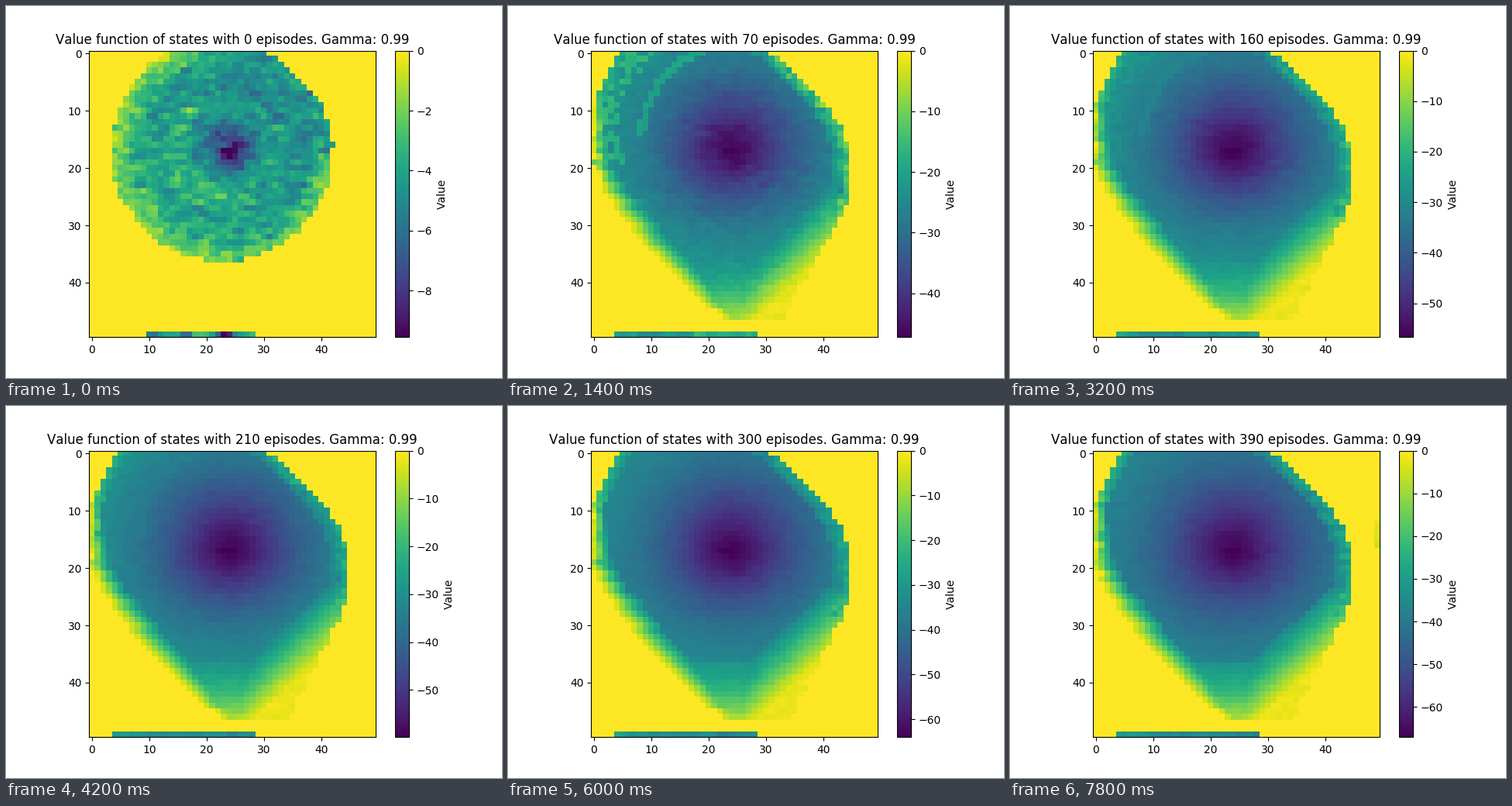
Write a matplotlib script that moves like this. It is 640 px wide and 480 px high and loops after 8 s.

```python
import numpy as np
import matplotlib.pyplot as plt
from matplotlib.animation import FuncAnimation

plt.rcParams["text.kerning_factor"] = 6

N = 50
FRAMES = 40
STEP_MS = 200
EPISODES_PER_FRAME = 10
ROW, COL = np.mgrid[0:N, 0:N].astype(float)
DX, DY = COL - 24, ROW - 17
DISC_RADIUS = 19


def grain(seed):
    """Cell noise, slightly stretched along the rows."""
    n = np.random.default_rng(seed).normal(size=(N, N))
    return (n + np.roll(n, 1, axis=1)) / 1.41


STEADY = grain(4)
DASHES = np.random.default_rng(11).random((N, N))
JITTER = np.random.default_rng(2).uniform(-.4, .4, (N, 1))


def lowest(episodes):
    return -(9.55 + 11.8 * np.log(1 + episodes / 3))


def growth(episodes):
    """0 for the first disc, 1 once the full region has been visited."""
    return min(1, np.sqrt(episodes / 30))


def bounds(episodes):
    """First and one-past-last visited column of every row."""
    r = ROW[:, :1]
    late = np.clip((episodes - 30) / 60, 0, 1)
    below = np.clip(r - 19, 0, None)
    left = (5 * np.clip(1 - r / 10, 0, None) ** 1.2
            + .418 * below + .016 * below ** 2)
    right = np.where(r < 20, 45.3 - .035 * (20 - r) ** 2,
                     45 - (.72 - .22 * late) * np.clip(r - 26, 0, None))
    right = np.minimum(right, 44 + late)

    dy = (r - 17.3) * np.where(r < 17, .94, 1)
    half = np.sqrt(np.clip(DISC_RADIUS ** 2 - dy ** 2, 0, None)) + JITTER
    inside = r < 37
    disc_left = np.where(inside, 23 - half, 24)
    disc_right = np.where(inside, np.minimum(23.3 + half, right), 24)

    g = growth(episodes)
    return (np.round(disc_left + (left - disc_left) * g),
            np.round(disc_right + (right - disc_right) * g))


def cone(episodes):
    """Dark pit in the middle that widens with training."""
    young = max(0, 1 - episodes / 70)
    top = np.interp(episodes, [0, 30, 70, 390], [.57, .42, .59, .51])
    scale = 14.5 - 10.5 * young
    dist = np.hypot(DX * np.where(DX < 0, 1.05, 1), DY * np.where(DY > 0, 1.22, 1))
    return top * (1 - np.exp(-(dist / scale) ** 1.4))


def trails():
    """Broken arcs in the upper left."""
    arc = np.hypot(DX, DY) + .15 * ROW
    solid = (np.abs(arc - 18) < .6) & (ROW < 15)
    dashed = (np.abs(arc - 23.2) < 1.6) & (DASHES < .4)
    return (solid | dashed) & (COL < 20) & (ROW < 20)


def slopes():
    """Bright ramps towards the lower corner."""
    side = (COL - 27.5) * .67 + (ROW - 36.5) * .74
    foot = ROW - 36.5
    side = np.where(side > -.5, np.minimum(.49 + .061 * side, .97), 0)
    foot = np.where(foot > 0, .52 + .02 * foot + .0018 * foot ** 2, 0)
    return np.maximum(side, foot)


def left_rim(edge):
    peak = np.interp(ROW, [6, 10], [.62, .93])
    depth = np.interp(ROW, [12, 30], [2, 5])
    return np.where(edge < depth, peak - (peak - .48) * edge / depth, 0)


def right_rim(edge, fresh):
    value = .58 + .15 * fresh - (.055 + .03 * fresh) * edge
    return np.where((edge < 3) & (ROW < 29), value, 0)


def first_disc():
    """Rings and bright rim of the untrained disc."""
    dist = np.hypot(DX + .8, DY)
    rings = .04 * np.cos((dist - 8) * 2 * np.pi / 10) * (dist > 5)
    edge = DISC_RADIUS - dist
    rim = np.where((edge < 3.5) & (DX - DY < 16), .8 - .06 * edge, 0)
    tilt = -.003 * (DX - DY)
    return rings + tilt, rim


def strip(episodes, fresh, noise):
    """Cells that wrapped round to the last row."""
    c = COL[0]
    start = round(4 + 6 * np.exp(-episodes / 20))
    new = 1 - growth(episodes)
    value = .5 - .0001 * episodes + .15 * fresh * (c > 17)
    value += .1 * np.exp(-(c - 4) / 3) - .45 * new * np.exp(-((c - 24) / 2.5) ** 2)
    value += (.03 + .1 * new) * noise
    return np.where((c >= start) & (c < 29), value, 1)


def shade(frame):
    """Position on the colour scale for each cell, 0 dark to 1 bright."""
    episodes = frame * EPISODES_PER_FRAME
    grown = growth(episodes)
    fresh = np.exp(-(episodes / 120) ** 2)
    left, right = bounds(episodes)
    from_left, from_right = COL - left, right - 1 - COL

    rings, disc_rim = first_disc()
    f = cone(episodes) + (1 - grown) * rings + .2 * fresh * grown * trails()
    mature = np.maximum.reduce([slopes(), left_rim(from_left),
                                right_rim(from_right, fresh)])
    f = np.maximum(f, (1 - grown) * disc_rim + grown * mature)

    ragged = ((from_right < 2) & (ROW < 29)) | (COL < 2)
    amount = .008 + .01 * fresh * grown + .06 * (1 - grown)
    amount = amount * (1 + 4 * grown * ragged)
    f += amount * (.6 * STEADY + .8 * grain(100 + frame))
    f[17, 24] = 0

    seen = (COL >= left) & (COL < right) & (ROW < 47)
    f = np.where(seen, f, 1)
    f[49] = strip(episodes, fresh, grain(300 + frame)[0])
    f[12:18, 49] -= .12 * np.clip((episodes - 300) / 60, 0, 1) * DASHES[12:18, 49]
    return np.clip(f, 0, 1)


fig, ax = plt.subplots(figsize=(6.4, 4.8), dpi=100)
image = ax.imshow(np.zeros((N, N)), cmap="viridis", vmin=lowest(0), vmax=0,
                  interpolation="nearest")
fig.colorbar(image, ax=ax, label="Value")
title = ax.set_title("")


def draw(frame):
    episodes = frame * EPISODES_PER_FRAME
    low = lowest(episodes)
    image.set_data(low * (1 - shade(frame)))
    image.set_clim(low, 0)
    title.set_text(f"Value function of states with {episodes} episodes. Gamma: 0.99")
    return image, title


anim = FuncAnimation(fig, draw, frames=FRAMES, interval=STEP_MS,
                     repeat=True, repeat_delay=0, blit=False)
plt.show()
```
